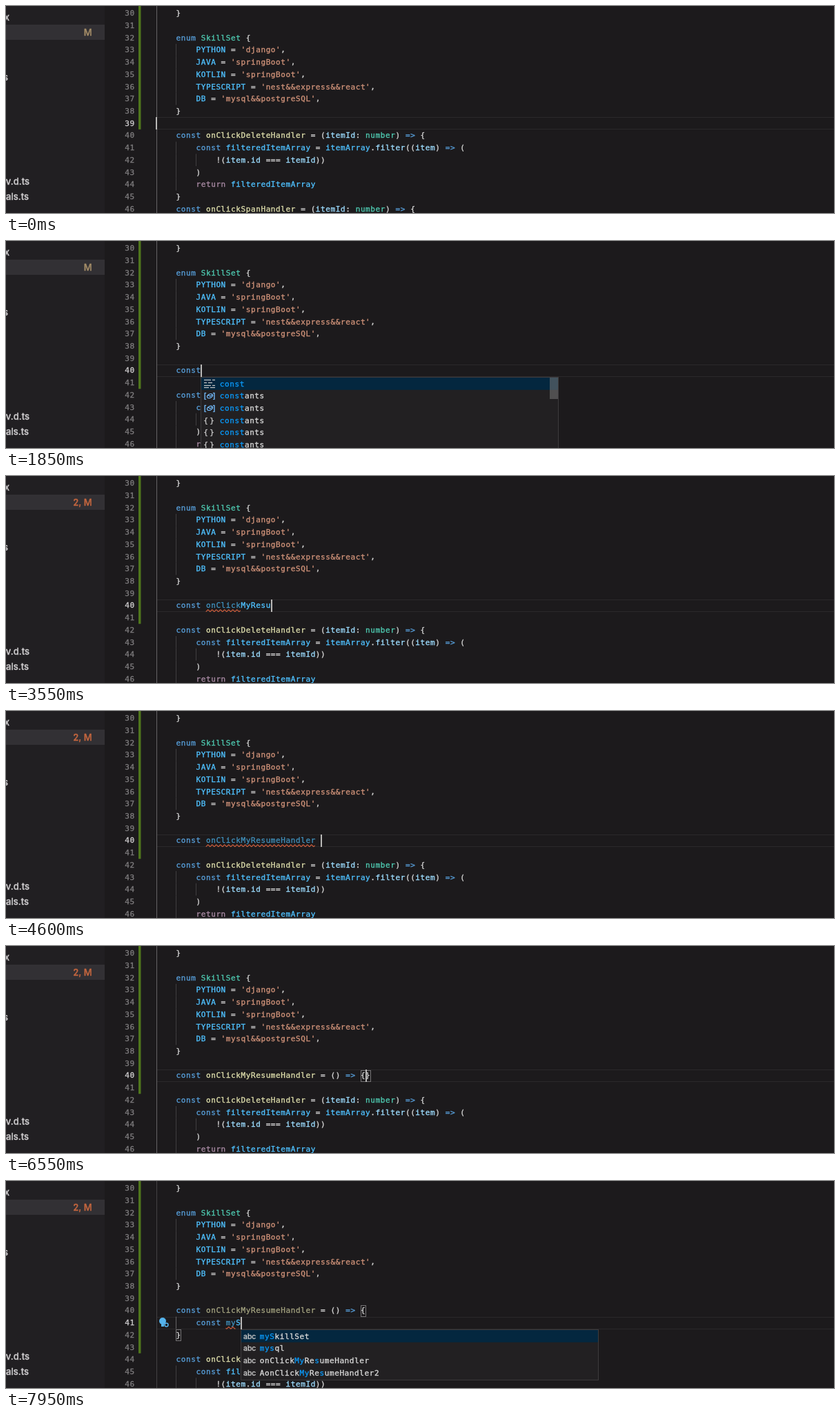
An HTML page with a canvas for the animation above (8 s loop, 1200 by 300 pixels).

```html
<!DOCTYPE html>
<html lang="en">
<head>
<meta charset="utf-8">
<title>Code editor</title>
<style>
  html, body { margin: 0; width: 100%; height: 100%; overflow: hidden; background: #1c1a1c; }
  canvas { display: block; }
</style>
</head>
<body>
<canvas id="stage" width="1200" height="300"></canvas>
<script>
const ctx = document.getElementById('stage').getContext('2d');
const LOOP = 8000, CHAR = 7.224, ROW = 17.72, LEFT = 246.3, POPUP_W = 518;
const MONO = '11px "DejaVu Sans Mono", monospace';
const SANS = '500 13px Inter, sans-serif';
const COLOR = {
  keyword: '#569cd6', control: '#a88aa3', string: '#ce9178', type: '#4ec9b0',
  func: '#dcdcaa', param: '#9cdcfe', constant: '#4fc1ff', plain: '#d4d4d4'
};

const before = `}

enum SkillSet {
    PYTHON = 'django',
    JAVA = 'springBoot',
    KOTLIN = 'springBoot',
    TYPESCRIPT = 'nest&&express&&react',
    DB = 'mysql&&postgreSQL',
}
`.split('\n');
const after = `const onClickDeleteHandler = (itemId: number) => {
    const filteredItemArray = itemArray.filter((item) => (
        !(item.id === itemId))
    )
    return filteredItemArray
}
const onClickSpanHandler = (itemId: number) => {`.split('\n');

// Typing runs: start time, ms per key, text
const outerKeys = [
  [1500, 110, 'co'], [1720, 60, 'nst'], [2050, 1, ' '], [2380, 1, 'o'], [2560, 45, 'nClic'],
  [2850, 150, 'kM'], [3150, 85, 'yResumeHandler'], [4600, 200, ' = '],
  [5250, 1, '('], [5500, 1, ')'], [5800, 150, ' => '], [6400, 1, '{']
];
const innerKeys = [
  [6850, 62, 'const'], [7300, 1, ' '], [7500, 1, 'm'], [7690, 1, 'y'], [7850, 1, 'S']
];
const ENTER = 6600;

// Diagnostics: from, to, line, column, length, underlined
const marks = [
  [2250, 3100, 40, 0, 5, true], [3100, 4300, 40, 6, 7, true], [4300, 5250, 40, 6, 22, true],
  [5250, 6400, 42, 0, 5, true], [6700, LOOP, 40, 6, 22, false], [7750, LOOP, 41, 10, 2, true]
];
const badges = [[0, 'M'], [2250, '1, M'], [3150, '2, M'], [5300, '1, M'],
                [6150, '2, M'], [6650, 'M'], [7550, '1, M'], [7750, '2, M']];

const suggestions = {
  c: ['const', ...Array(11).fill('constants')],
  o: ['onClick', 'onClickDeleteHandler', 'onClickFormBtnHandler', 'onClickSpanHandler'],
  m: ['mySkillSet', 'mysql', 'onClickMyResumeHandler', 'AonClickMyResumeHandler2']
};

const xOf = col => LEFT + col * CHAR;
const yOf = line => 10.5 + (line - 30) * ROW;
const within = (t, from, to) => t >= from && t < to;
const typed = (keys, t) => keys.map(([start, step, text]) =>
  t < start ? '' : text.slice(0, Math.floor((t - start) / step) + 1)).join('');

function rect(x, y, w, h, color) {
  ctx.fillStyle = color;
  ctx.fillRect(x, y, w, h);
}

function box(x, y, w, h, color) {
  ctx.strokeStyle = color;
  ctx.lineWidth = 1;
  ctx.strokeRect(Math.round(x) + .5, Math.round(y) + .5, w, h);
}

// A hairline outline gives the slightly heavy look of smoothed screen text
function label(text, x, y, color, font = MONO, align = 'left') {
  ctx.font = font;
  ctx.fillStyle = ctx.strokeStyle = color;
  ctx.textAlign = align;
  ctx.lineWidth = .35;
  const base = Math.round(y + 3.7);
  ctx.fillText(text, x, base);
  ctx.strokeText(text, x, base);
}

// Code characters sit centred in fixed cells
function codeChar(ch, x, y, color) {
  label(ch, x + CHAR / 2, y, color, MONO, 'center');
}

function codeText(text, x, y, color) {
  [...text].forEach((ch, i) => codeChar(ch, x + i * CHAR, y, color));
}

function tokenColor(token, line) {
  if (/^(const|enum|=>)$/.test(token)) return COLOR.keyword;
  if (token === 'return') return COLOR.control;
  if (token[0] === "'") return COLOR.string;
  if (/^(SkillSet|number)$/.test(token)) return COLOR.type;
  if (/^onClick\w+Handler$/.test(token) && line.includes('=> {')) return COLOR.func;
  if (/^(itemId|item|id|filter)$/.test(token)) return COLOR.param;
  return /^\w/.test(token) ? COLOR.constant : COLOR.plain;
}

function drawCode(text, line, faded) {
  for (const { 0: token, index } of text.matchAll(/'[^']*'|\w+|=>|\S/g)) {
    const color = tokenColor(token, text);
    [...token].forEach((ch, i) => {
      const col = index + i;
      ctx.globalAlpha = faded.some(([, , l, c, n]) => l === line && col >= c && col < c + n) ? .62 : 1;
      codeChar(ch, xOf(col), yOf(line), color);
    });
  }
  ctx.globalAlpha = 1;
}

function squiggle(line, col, length) {
  const y = yOf(line) + 7.5;
  ctx.beginPath();
  for (let x = xOf(col); x < xOf(col + length); x++)
    ctx.lineTo(x, y + 1.3 * Math.sin((x - LEFT) * Math.PI / 3));
  ctx.strokeStyle = '#d8623f';
  ctx.lineWidth = 1.1;
  ctx.stroke();
}

function fuzzy(word, name) {
  const hits = new Set();
  let from = 0;
  for (const ch of word.toLowerCase()) {
    const at = name.toLowerCase().indexOf(ch, from);
    if (at < 0) return null;
    hits.add(at);
    from = at + 1;
  }
  return hits;
}

function keywordIcon(x, y) {
  [[0, -6, 10], [12, -6, 4], [0, -2, 4], [6, -2, 6], [0, 2, 10], [12, 2, 4], [0, 5, 7], [9, 5, 7]]
    .forEach(([dx, dy, w]) => rect(x + dx, y + dy, w, 1.2, '#c5c5c5'));
}

function variableIcon(x, y) {
  codeText('[', x - 2, y, '#75beff');
  codeText(']', x + 11, y, '#75beff');
  ctx.strokeStyle = '#75beff';
  ctx.lineWidth = 1.1;
  ctx.beginPath();
  ctx.ellipse(x + 8.5, y, 4.3, 2.7, -.5, 0, 7);
  ctx.moveTo(x + 6, y - 1);
  ctx.lineTo(x + 9, y + .5);
  ctx.lineTo(x + 12, y - 2);
  ctx.stroke();
}

function drawPopup(word, x, top, detail) {
  const isKeyword = word[0] === 'c';
  const items = suggestions[word[0]].filter(name => fuzzy(word, name));
  const height = items.length * ROW + 2;
  rect(x, top, POPUP_W, height, '#222022');
  rect(x + 1, top + 1, POPUP_W - 1, ROW, '#04273f');
  items.forEach((name, i) => {
    const y = top + 1 + (i + .5) * ROW, hits = fuzzy(word, name);
    if (!isKeyword) label('abc', x + 4, y, '#c5c5c5', '10.5px Inter, sans-serif');
    else if (i === 0) keywordIcon(x + 5, y);
    else if (i < 3) variableIcon(x + 5, y);
    else {
      codeText('{', x + 4, y, '#c5c5c5');
      codeText('}', x + 13, y, '#c5c5c5');
    }
    [...name].forEach((ch, k) =>
      codeChar(ch, x + 27.5 + k * CHAR, y, hits.has(k) ? '#0a97f5' : '#d8d8d8'));
  });
  if (isKeyword && detail) codeText('const', x + 470, top + 1 + ROW / 2, '#c8c8c8');
  if (isKeyword) rect(x + POPUP_W - 12, top + 1, 12, 31, '#79797988');
  box(x, top, POPUP_W, height, '#3d3b3d');
}

function drawSidebar(t) {
  rect(0, 0, 143, 300, '#211f22');
  rect(0, 27, 143, 22, '#323034');
  [['x', 5, 17], ['s', 3, 104], ['v.d.ts', 34, 255], ['als.ts', 33, 277]]
    .forEach(([text, right, y]) => label(text, right, y + .7, '#cccacc', SANS, 'right'));
  const badge = badges.filter(([from]) => t >= from).pop()[1];
  label(badge, 124.5, 39, badge === 'M' ? '#a58d68' : '#c4663f', SANS, 'right');
}

function drawBulb(x, y) {
  ctx.fillStyle = '#55b3ec';
  ctx.beginPath();
  ctx.arc(x, y, 5, 0, 7);
  ctx.fill();
  rect(x - 2, y + 4, 4, 4, '#55b3ec');
  ctx.beginPath();
  ctx.arc(x + 5.5, y + 5.5, 2.5, 0, 7);
  ctx.fillStyle = '#1c1a1c';
  ctx.fill();
  ctx.strokeStyle = '#55b3ec';
  ctx.lineWidth = 1.5;
  ctx.stroke();
}

function render(t) {
  const outer = typed(outerKeys, t), inner = '    ' + typed(innerKeys, t);
  const entered = t >= ENTER;
  const closer = within(t, 5250, 5500) ? ')' : within(t, 6400, ENTER) ? '}' : '';
  const edited = t < 350 ? [] : t < 550 ? [''] : entered ? [outer, inner, '}', ''] : [outer + closer, ''];
  const lines = [...before, ...edited, ...after];
  const cursorLine = t < 350 ? 39 : within(t, 550, 900) || entered ? 41 : 40;
  const cursorCol = t < 1100 ? -4 : entered ? inner.length : outer.length;
  const active = marks.filter(([from, to]) => within(t, from, to));

  rect(0, 0, 1200, 300, '#1c1a1c');
  drawSidebar(t);
  rect(192, 0, 3.5, yOf(39 + edited.length) + ROW / 2, '#4f751c');

  const rowTop = Math.round(yOf(cursorLine) - ROW / 2);
  rect(219, rowTop, 981, 1, '#2b292b');
  rect(219, rowTop + 17, 981, 1, '#2b292b');
  rect(218, 0, 1, 300, entered ? '#434143' : '#656365');

  lines.forEach((text, i) => {
    const line = 30 + i, y = yOf(line);
    if (y > 310) return;
    codeText(String(line), 186.5 - 2 * CHAR, y, line === cursorLine ? '#cfcdcf' : '#7d7b7d');
    const indent = text.match(/^ */)[0].length / 4;
    for (let k = 0; k < indent; k++)
      rect(Math.round(xOf(4 * k)), y - ROW / 2, 1, ROW, entered && line === 41 ? '#656365' : '#403e40');
    drawCode(text, line, active.filter(mark => mark[3] > 0));
  });

  active.filter(mark => mark[5]).forEach(([, , line, col, length]) => squiggle(line, col, length));

  const brackets = within(t, 5250, 5800) ? [[40, 31], [40, 32]]
    : entered ? [[40, 37], [42, 0]]
    : t >= 6400 ? [[40, 37], [40, 38]] : [];
  brackets.forEach(([line, col]) => box(xOf(col), yOf(line) - 8, 7, 16, '#757375'));

  if (t >= 7800) drawBulb(227, 203);
  rect(Math.round(xOf(cursorCol)), rowTop, 2, 18, '#b9b8b7');

  const word = (entered ? inner : outer).match(/\w+$/);
  if (word && !within(t, 3150, ENTER))
    drawPopup(word[0], Math.round(xOf(cursorCol)), rowTop + 18, t >= 7120);
}

function frame() {
  render(performance.now() % LOOP);
  requestAnimationFrame(frame);
}
frame();
</script>
</body>
</html>
```
